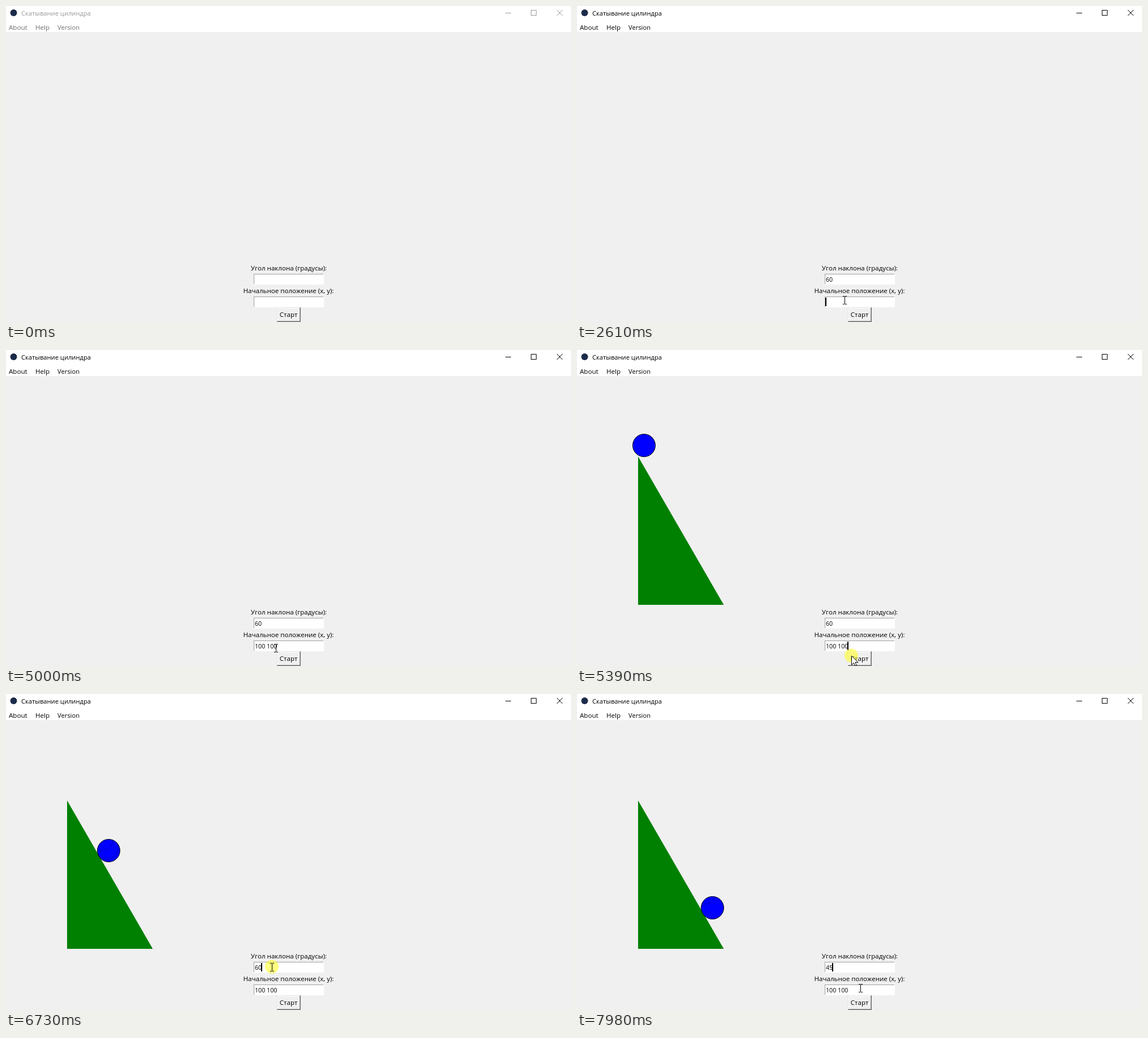
Animation of 999 by 558 pixels, one loop 8000 ms. Source, as an HTML page with a canvas:

```html
<!DOCTYPE html>
<html lang="ru">
<head>
<meta charset="utf-8">
<title>Скатывание цилиндра</title>
<style>
  html, body { margin: 0; width: 100%; height: 100%; overflow: hidden; background: #f0f0f0; }
  canvas { display: block; }
</style>
</head>
<body>
<canvas id="stage" width="999" height="558"></canvas>
<script>
const ctx = document.getElementById('stage').getContext('2d');
const LOOP = 8000;
const ACTIVATE = 730, FOCUS_SECOND = 2490, FOCUS_FIRST = 6710;
const LAUNCH = 5370, DRAG = 6760, RETYPE = 7560;

// Pointer moves: start, end, x, y
const moves = [
  [270, 690, 493, 479],
  [2180, 2450, 473, 519],
  [4880, 5180, 485, 540],
  [6230, 6490, 470, 482],
  [DRAG, 7100, 383, 482],
  [7360, 7800, 501, 519]
];
const presses = [[700, 810], [2470, 2600], [5260, 5450], [6690, 7110]];
const typedFirst = [[1530, '6'], [1650, '60']];
const typedSecond = [[3650, '1'], [3750, '10'], [3900, '100'], [4050, '100 '],
  [4110, '100 1'], [4200, '100 10'], [4380, '100 100']];
const scuffs = [8, 13, 18, 26, 29, 34, 45, 51, 60, 66, 77, 81, 95, 106];

const within = (t, [from, to]) => t >= from && t < to;
const typed = (t, steps) => steps.reduce((text, [at, next]) => t >= at ? next : text, '');
const caretOn = (t, focus) => (t - focus) % 900 < 600;

function rect(color, x, y, w, h) {
  ctx.fillStyle = color;
  ctx.fillRect(x, y, w, h);
}

// One-pixel frame with separate colours for its lit and shaded sides
function bevel(topLeft, bottomRight, x, y, w, h) {
  rect(topLeft, x, y, w - 1, 1);
  rect(topLeft, x, y, 1, h - 1);
  rect(bottomRight, x, y + h - 1, w, 1);
  rect(bottomRight, x + w - 1, y, 1, h);
}

function label(text, x, y, size, color = '#000', align = 'left') {
  ctx.font = `${size}px "Open Sans", sans-serif`;
  ctx.textAlign = align;
  ctx.fillStyle = color;
  ctx.fillText(text, x, y);
}

function path(points, close) {
  ctx.beginPath();
  points.forEach(([x, y]) => ctx.lineTo(x, y));
  if (close) ctx.closePath();
}

function disc(x, y, r) {
  ctx.beginPath();
  ctx.arc(x, y, r, 0, 7);
}

function drawChrome(active) {
  rect('#fff', 0, 0, 999, 46);
  const ink = active ? '#000' : '#999';
  const menuInk = active ? '#000' : '#6d6d6d';
  ctx.fillStyle = '#1c2b4a';
  disc(13.5, 12, 6);
  ctx.fill();
  label('Скатывание цилиндра', 27, 17, 11.2, ink);
  label('About', 5, 42, 11.6, menuInk);
  label('Help', 52, 42, 11.6, menuInk);
  label('Version', 91, 42, 11.2, menuInk);
  rect(ink, 883, 12, 10, 1);
  ctx.strokeStyle = ink;
  ctx.lineWidth = 1;
  ctx.strokeRect(928.5, 7.5, 9, 9);
  path([[974, 7], [984, 17]]);
  ctx.stroke();
  path([[984, 7], [974, 17]]);
  ctx.stroke();
}

function drawEntry(y, text, caretIndex, selectFrom) {
  const textWidth = part => {
    ctx.font = '10.7px "Open Sans", sans-serif';
    return Math.floor(ctx.measureText(part).width);
  };
  rect('#fff', 438, y, 124, 19);
  bevel('#a0a0a0', '#fff', 438, y, 124, 19);
  label(text, 440, y + 14, 10.7);
  if (selectFrom < text.length) {
    const x = 440 + textWidth(text.slice(0, selectFrom));
    const right = 440 + textWidth(text);
    rect('#0078d7', x, y + 2, right - x, 15);
    label(text.slice(selectFrom), x, y + 14, 10.7, '#fff');
  }
  if (caretIndex >= 0) rect('#000', 439 + textWidth(text.slice(0, caretIndex)), y + 2, 2, 15);
}

function drawButton(pressed) {
  rect('#f0f0f0', 479, 532, 42, 26);
  if (pressed) {
    bevel('#a0a0a0', '#fff', 479, 532, 42, 26);
    bevel('#696969', '#e3e3e3', 480, 533, 40, 24);
  } else {
    bevel('#e3e3e3', '#696969', 479, 532, 42, 26);
    bevel('#fff', '#a0a0a0', 480, 533, 40, 24);
  }
  const shift = pressed ? 1 : 0;
  label('Старт', 499.5 + shift, 549 + shift, 11.6, '#000', 'center');
}

function drawForm(t, pointer) {
  label('Угол наклона (градусы):', 500, 467, 11.6, '#000', 'center');
  label('Начальное положение (x, y):', 499.5, 507, 11.6, '#000', 'center');

  let first = typed(t, typedFirst), firstCaret = -1, selectFrom = Infinity;
  if (t >= FOCUS_FIRST) {
    if (t < RETYPE) {
      selectFrom = t < DRAG ? 2 : Math.max(0, Math.min(2, Math.round((pointer.x - 440) / 6)));
    } else {
      first = t < 7700 ? '4' : '45';
    }
    if (caretOn(t, FOCUS_FIRST)) firstCaret = Math.min(selectFrom, first.length);
  } else if (t >= ACTIVATE && t < FOCUS_SECOND && caretOn(t, ACTIVATE)) {
    firstCaret = first.length;
  }
  drawEntry(473, first, firstCaret, selectFrom);

  const second = typed(t, typedSecond);
  const secondFocused = within(t, [FOCUS_SECOND, FOCUS_FIRST]);
  drawEntry(513, second, secondFocused && caretOn(t, FOCUS_SECOND) ? second.length : -1, Infinity);
  drawButton(within(t, [5260, LAUNCH]));
}

function drawRamp(t) {
  if (t < LAUNCH) return;
  ctx.fillStyle = '#008000';
  path([[108, 188], [108, 450], [259.5, 450]], true);
  ctx.fill();

  const travel = t < 5395 ? 0 : Math.round(0.0463 * (t - 5366));
  const center = d => [118.5 + d, 168.5 + Math.floor(1.728 * d)];
  ctx.lineWidth = 1;
  ctx.save();
  disc(...center(travel), 20);
  ctx.fillStyle = '#00f';
  ctx.fill();
  ctx.clip();
  ctx.strokeStyle = '#0000a8';
  for (const d of scuffs) {
    if (d < travel - 2 && d > travel - 17) {
      disc(...center(d), 20);
      ctx.stroke();
    }
  }
  ctx.restore();
  ctx.strokeStyle = '#000';
  disc(...center(travel), 20);
  ctx.stroke();
}

function pointerAt(t) {
  let x = 500, y = 580;
  for (const [from, to, nextX, nextY] of moves) {
    const p = Math.max(0, Math.min(1, (t - from) / (to - from)));
    const eased = p * p * (3 - 2 * p);
    x += (nextX - x) * eased;
    y += (nextY - y) * eased;
  }
  return { x: Math.round(x), y: Math.round(y) };
}

function drawPointer(t, { x, y }) {
  if (t < 270) return;
  if (presses.some(span => within(t, span))) {
    ctx.fillStyle = 'rgba(255, 255, 0, 0.5)';
    disc(x, y - 0.5, 12);
    ctx.fill();
  }
  const overEntry = x >= 438 && x < 562 && (y >= 473 && y < 492 || y >= 513 && y < 532);
  if (overEntry || within(t, [DRAG, 7110])) {
    rect('#000', x, y - 6, 1, 13);
    for (const edge of [y - 7, y + 7]) {
      rect('#000', x - 3, edge, 3, 1);
      rect('#000', x + 1, edge, 3, 1);
    }
    return;
  }
  ctx.save();
  ctx.translate(x + 0.5, y);
  path([[0, 0], [0, 16], [4, 12.5], [6.5, 18], [9, 17], [6.5, 11.5], [11.5, 11.5]], true);
  ctx.fillStyle = '#fff';
  ctx.fill();
  ctx.strokeStyle = '#000';
  ctx.lineWidth = 1;
  ctx.stroke();
  ctx.restore();
}

function draw(now) {
  const t = now % LOOP;
  const pointer = pointerAt(t);
  rect('#f0f0f0', 0, 0, 999, 558);
  drawChrome(t >= ACTIVATE);
  drawRamp(t);
  drawForm(t, pointer);
  drawPointer(t, pointer);
}

const start = performance.now();
function tick() {
  draw(performance.now() - start);
  requestAnimationFrame(tick);
}
tick();
</script>
</body>
</html>
```
